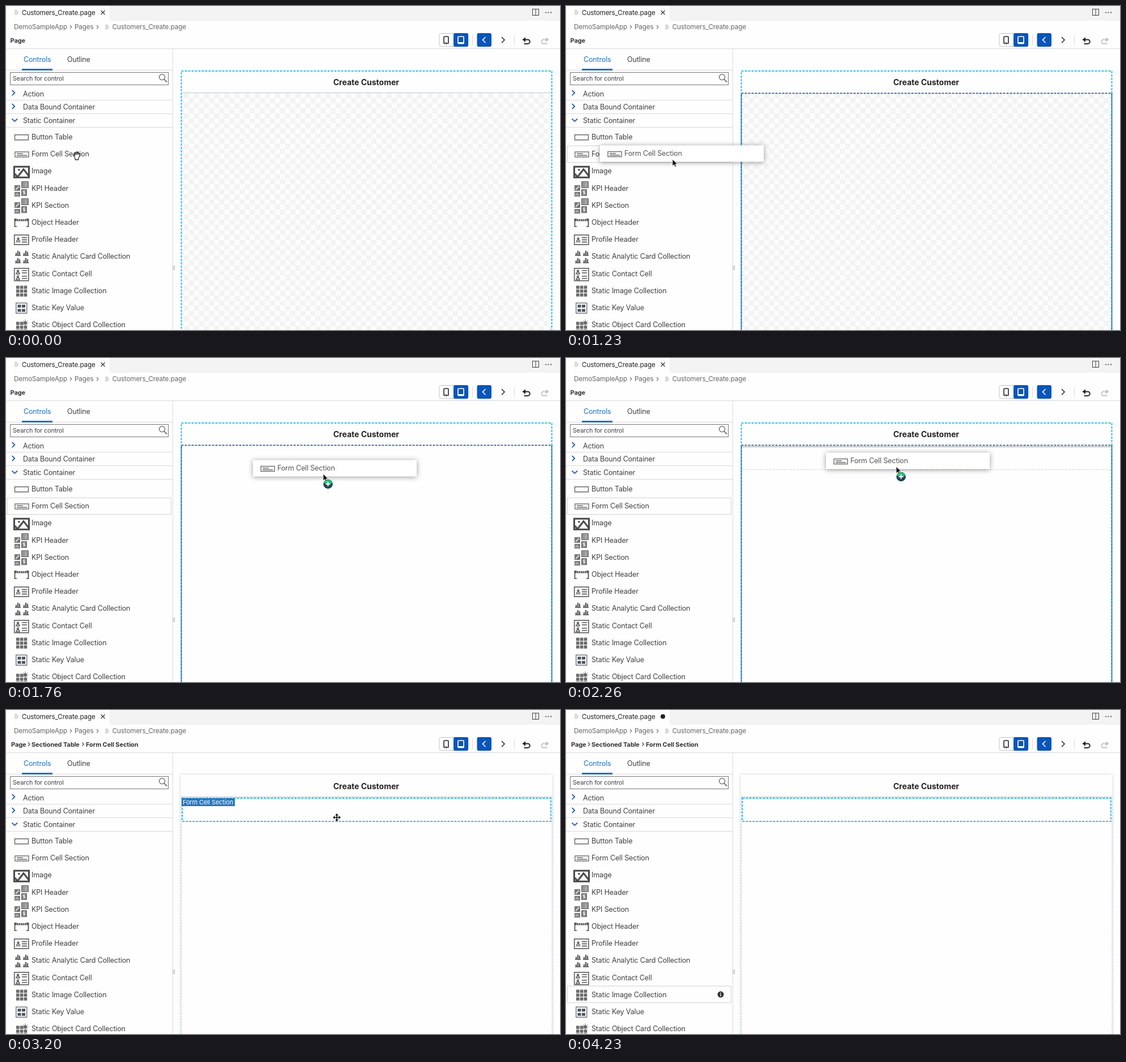
Recreate the animation shown at these times as an HTML page. Size 978 by 573 pixels, loop 4.63 s.

```html
<!DOCTYPE html>
<html lang="en">
<head>
<meta charset="utf-8">
<title>Page editor</title>
<style>
html, body { margin: 0; width: 100%; height: 100%; overflow: hidden; background: #fefefe; }
svg { display: block; }
text { font: 12.5px Inter, "Open Sans", sans-serif; letter-spacing: -.15px; fill: #404040; white-space: pre; }
.tab { font-size: 11.7px; fill: #222; }
.crumb { font-size: 11.7px; letter-spacing: -.11px; fill: #666; }
.path { font-size: 11px; font-weight: 700; letter-spacing: -.1px; fill: #333; }
.small { font-size: 10.9px; }
.label { font-size: 11px; fill: #fff; }
.title { font-size: 14px; font-weight: 700; letter-spacing: 0; fill: #222; }
.blue { fill: #1a6fc9; }
.card { fill: #555; }
</style>
</head>
<body>
<svg id="stage" width="978" height="573" viewBox="0 0 978 573"></svg>
<script>
const LOOP = 4630;
const CYAN = '#35bce6', NAVY = '#235f9b', BLUE = '#0a55b7', GRAY = '#6b6b6b';

const rect = (x, y, w, h, fill, more = '') =>
  `<rect x="${x}" y="${y}" width="${w}" height="${h}" fill="${fill}" ${more}/>`;
const line = (d, color, w = 1, more = '') =>
  `<path d="${d}" fill="none" stroke="${color}" stroke-width="${w}" ${more}/>`;
const box = (x, y, w, h, color, sw = 1, more = '') =>
  rect(x, y, w, h, 'none', `stroke="${color}" stroke-width="${sw}" ${more}`);
const dot = (x, y, r, fill) => `<circle cx="${x}" cy="${y}" r="${r}" fill="${fill}"/>`;
const text = (x, y, s, cls = '') => `<text x="${x}" y="${y}" class="${cls}">${s}</text>`;
const at = (x, y, s) => `<g transform="translate(${x} ${y})">${s}</g>`;
const show = (from, to, s) => `<g data-span="${from},${to}">${s}</g>`;
const dash = (a, b) => `stroke-dasharray="${a} ${b}"`;
const grid = (cols, rows, f) =>
  Array.from({ length: cols * rows }, (_, i) => f(i % cols, Math.floor(i / cols))).join('');

// Icons of the control list, drawn around the row centre
const person = (x, y) => dot(x, y - 2, 2.2, GRAY) + line(`M${x - 3} ${y + 3.5}q0 -3 3 -3t3 3z`, GRAY, 1.6);
const formIcon = box(16, -3.5, 24, 9, GRAY, 1.4) + line('M19 -.3h11M19 2.8h18', GRAY, 1.4);
const kpiIcon =
  rect(15, -5, 10, 10, '#777') + line('M17 3l6 -6', '#fff', 1.4) +
  rect(27, -12, 13, 12, '#777') + line('M29 -9h2m1 0h6M29 -6h2m1 0h6M29 -3h2m1 0h6', '#fff') +
  rect(15, 7, 10, 8, '#777') + line('M17.5 13v-3m2.5 3v-4m2.5 4v-2', '#fff') +
  rect(27, 2, 10, 12, '#777') + line('M34 5.5q-4 -1.5 -4 .8t4 2q0 3 -4 1.7M32 4v8', '#fff');
const icons = {
  'Button Table': box(15.5, -3.5, 24, 9, GRAY, 1.5),
  'Form Cell Section': formIcon,
  'Image': box(14.5, -7.5, 26, 19, '#484848', 3) +
    line('M20 11l11 -14 10 13M20 11l-4 -6', '#484848', 3) + dot(23, -2, 1.8, '#484848'),
  'KPI Header': kpiIcon,
  'KPI Section': kpiIcon,
  'Object Header': line('M19 -5.5h-3.5v13h3.5M36 -5.5h3.5v13h-3.5', '#555', 1.8) +
    line('M16 -3.5h23', '#555', 3.6, dash(2.6, .8)),
  'Profile Header': box(14.8, -7.5, 25, 17, GRAY, 1.8) + person(21.5, 1) + line('M28 -3h9M28 1h9M28 5h9', GRAY, 1.8),
  'Static Analytic Card Collection': grid(2, 2, (i, j) =>
    at(16 + i * 14, j * 13, line('M0 -1.5h10', '#555', 1.5) + line('M2 -2v-4m3 4v-8m3 8v-6', '#555', 2.2))),
  'Static Contact Cell': box(14.8, -9, 25, 22, GRAY, 1.8) + person(21, -2.5) + person(21, 7.5) +
    line('M28 -5h9M28 -1h9M28 5h9M28 9h9', GRAY, 1.6),
  'Static Image Collection': grid(3, 3, (i, j) => rect(18 + i * 6.8, -8.5 + j * 6.8, 5.6, 5.6, GRAY)),
  'Static Key Value': box(17.8, -8, 19, 18, '#667', 1.3) +
    grid(2, 2, (i, j) => rect(20.5 + i * 7.5, -5 + j * 7.5, 6, 5, '#4a5560')),
  'Static Object Card Collection':
    grid(3, 3, (i, j) => i == 2 && !j ? '' : rect(18 + i * 6.8, -5 + j * 6.8, 5.6, 5.6, GRAY)) +
    dot(34, -3, 3, GRAY) + line('M34 -9v12M28 -3h11M30 -7l8 8M38 -7l-8 8', GRAY)
};
const rowY = i => 231.3 + i * 30.2;
const rows = Object.keys(icons).map((name, i) =>
  at(0, rowY(i), icons[name] + text(45, 4.6, name))).join('');

const listMark = (x, y) => line(`M${x} ${y - 3}h5M${x} ${y}h7M${x} ${y + 3}h6`, '#999');
const chevron = (x, y, color, w = 1.2, s = 3) => line(`M${x - s / 2} ${y - s}l${s} ${s}l${-s} ${s}`, color, w);
const info = y => dot(273, y, 5.5, '#333') + line(`M273 ${y - 3.3}v1.6m0 1v3.8`, '#fff', 1.5);
const hover = y => box(2.5, y - 14.7, 289, 29.5, '#d2d2d2');

const tabs = rect(183, 0, 795, 26, '#f3f3f3') + listMark(15, 11) +
  text(28, 15.7, 'Customers_Create.page', 'tab') +
  show(0, 3630, line('M167.5 8l7 7m0 -7l-7 7', '#333', 1.2)) +
  show(3630, LOOP, dot(171, 11.5, 4, '#222')) +
  box(929.5, 5.5, 11, 11, '#444') + line('M935 6v10', '#444') +
  [953, 957.5, 962].map(x => dot(x, 11.5, 1.1, '#444')).join('');

const crumbs = text(14, 41, 'DemoSampleApp', 'crumb') + chevron(114.5, 37, '#777') +
  text(121, 41, 'Pages', 'crumb') + chevron(161.5, 37, '#777') + listMark(175, 37) +
  text(187.5, 41, 'Customers_Create.page', 'crumb') +
  show(0, 2760, text(7.5, 64.5, 'Page', 'path')) +
  show(2760, LOOP, text(9, 64.5, 'Page', 'path') + chevron(40.5, 60.5, '#444') +
    text(45, 64.5, 'Sectioned Table', 'path') + chevron(136, 60.5, '#444') +
    text(141, 64.5, 'Form Cell Section', 'path'));

const undo = color => line('M1 4h8.2a3.6 3.6 0 0 1 0 7.2h-6.7', color, 1.9) +
  `<path d="M-.5 4l5.5 -4.3v8.6z" fill="${color}"/>`;
const toolbar = box(765, 48.5, 51, 23, '#c4c4c4', 1, 'rx="3"') +
  box(773, 54, 8, 12.5, '#222', 1.6, 'rx="1.5"') + line('M775.5 64.5h3', '#222') +
  rect(790, 48, 26, 24, BLUE, 'rx="3"') + box(798, 54, 10, 12.5, '#fff', 1.7, 'rx="1"') + line('M798 65h10', '#fff', 2) +
  rect(831.5, 48, 25.5, 24, BLUE, 'rx="3"') + line('M846.5 55l-5 5 5 5', '#fff', 1.6) +
  chevron(877.5, 60, '#333', 1.6, 5) + line('M823.5 50v20M897.5 50v20', '#ddd') +
  at(912, 55.5, undo('#222')) + `<g transform="translate(958 55.5) scale(-1 1)">${undo('#c4c4c4')}</g>` +
  line('M0 75.5h978', '#dadada');

const panel = line('M294.5 76v497', '#dcdcdc') + line('M.5 0v573', '#fdeeea') +
  text(31, 99.2, 'Controls', 'blue') + text(108, 99.2, 'Outline') +
  line('M0 113.5h294', '#d9d9d9') + rect(28, 111, 54, 3, '#1a6fc9') +
  box(7.5, 117.5, 279, 22, '#777') + text(12, 132.3, 'Search for control', 'small') +
  `<circle cx="275.5" cy="125.7" r="5" fill="none" stroke="#777" stroke-width="1.5"/>` + line('M279 129.5l5 5', '#777', 2) +
  line('M0 166.5h294M0 190.5h294M0 214.5h294', '#dadada') +
  chevron(13, 153.5, NAVY, 1.8, 4.6) + chevron(13, 177.5, NAVY, 1.8, 4.6) + line('M10.5 199.5l4.8 4.6 4.8 -4.6', NAVY, 1.8) +
  text(30, 159.5, 'Action') + text(30, 183.4, 'Data Bound Container') + text(30, 207.4, 'Static Container') +
  line('M295 459v8M297.5 459v8', '#aaa') +
  show(130, 2600, hover(rowY(1) + .5)) + show(130, 1160, info(rowY(1) + .3)) +
  show(4230, LOOP, hover(rowY(9) - .2) + info(rowY(9))) + rows;

const page =
  show(0, 1760, rect(310, 154, 653, 419, 'url(#checker)')) +
  show(0, 2600, box(309.5, 115, 654, 480, CYAN, 2, dash(4, 2))) +
  show(0, 1160, line('M311 153.5h651', '#b9cfd3')) +
  show(1160, 2600, box(309.5, 154.3, 654, 450, NAVY, 1.8, dash(4, 2))) +
  show(1960, 2600, line('M311 157h651', '#b5b5ba', 1.6) + line('M311 197.5h651', '#b4dff0', 1, dash(4, 2))) +
  show(2600, LOOP,
    rect(308.5, 114.5, 656, 500, '#fefefe', 'style="filter:drop-shadow(0 0 2px #0003)"') +
    line('M309 153.5h655', '#c9d3d8') + box(309.5, 154.5, 654.5, 450, '#a9cfe2', 1, dash(3, 2))) +
  show(2760, LOOP, box(311.3, 156, 650.5, 41, CYAN, 2, dash(4, 2))) +
  show(3130, 3430, rect(310, 156, 94, 14, '#2a76bb') + text(312, 167, 'Form Cell Section', 'label')) +
  text(577.7, 139.5, 'Create Customer', 'title');

const dragCard = rect(0, 0, 289, 29, '#fff', 'style="filter:drop-shadow(0 1px 5px #0006)"') +
  at(-2, 14.5, formIcon) + text(43, 18.8, 'Form Cell Section', 'card');

const solid = (d, fill, stroke, w) =>
  `<path d="${d}" fill="${fill}" stroke="${stroke}" stroke-width="${w}" stroke-linejoin="round"/>`;
const arrow = solid('M0 0v12l2.7 -2.5 1.8 4 2.1 -.9 -1.8 -3.9h3.8z', '#111', '#fff', .7);
const openHand = solid('M-5.5 1q-2 -2 0 -2.5l2 1.5 -1 -4q0 -1.5 1.5 -1l1.3 3v-4q1 -1.3 2 0v4l1 -3.5q1.2 -1 1.8 .3l-.6 3.7 1.2 -1.5q1.5 -.6 1.7 .6l-1.7 5 -1.5 3v1.8h-5.5v-1.8z', '#fff', '#111', 1.1);
const closedHand = solid('M-5 1q-2 -3 0 -3.5l1 1v-2q1 -1.5 2 -.3 1 -1.2 2.2 0 1.2 -1 2.2 .2 1.5 -.8 2 .6v4l-1.5 3v2.5h-5.5v-2.5z', '#fff', '#111', 1.1) +
  line('M-1.9 -3v2.5M.4 -3.5v3M2.6 -3v2.5', '#111', .9);
const plusBadge = dot(8.5, 18, 8.3, '#1d4653') +
  '<path d="M.8 16a8 8 0 0 1 15.4 0q-7.7 3 -15.4 0z" fill="#1fc36f"/>' + line('M8.5 14v8M4.5 18h8', '#fff', 1.8);
const fourWay = line('M-5 0h10M0 -5v10', '#111', 1.6) +
  '<path d="M0 -7l3 3.5h-6zM0 7l3 -3.5h-6zM-7 0l3.5 -3v6zM7 0l-3.5 -3v6z" fill="#111"/>';
const cursors = show(0, 830, openHand) + show(830, 1160, closedHand) + show(1430, 2600, plusBadge) +
  show(1160, 2860, arrow) + show(2860, 3530, fourWay) + show(3530, 3730, arrow);

const TILE = 17.9, CELL = TILE / 2;
const checker = `<defs><pattern id="checker" x="304.9" y="145.2" width="${TILE}" height="${TILE}" patternUnits="userSpaceOnUse">` +
  rect(0, 0, TILE, TILE, '#fcfcfc') + rect(0, 0, CELL, CELL, '#f3f3f4') + rect(CELL, CELL, CELL, CELL, '#f3f3f4') +
  '</pattern></defs>';

const stage = document.getElementById('stage');
stage.innerHTML = checker + tabs + crumbs + toolbar + panel + page +
  show(1160, 2600, `<g id="card">${dragCard}</g>`) + `<g id="cursor">${cursors}</g>`;

// Pointer: time, x, y; each place holds until the next
const pointer = [
  [0, 125.5, 264.5], [30, 126, 266], [130, 128, 269], [230, 129, 271], [330, 130, 272],
  [1160, 152, 272], [1230, 188, 271], [1330, 226, 268], [1360, 243, 266], [1430, 268, 262],
  [1460, 290, 258], [1560, 331, 253], [1660, 450, 225], [1760, 560, 205], [1960, 590, 198],
  [2130, 588, 196], [2160, 586, 194], [2260, 583, 192], [2360, 583, 191], [2600, 584, 190],
  [3430, 565, 222], [3530, 468, 340], [3630, 365, 455], [3660, 320, 508], [3730, 250, 600]
];
const spans = [...stage.querySelectorAll('[data-span]')].map(el => [el, ...el.dataset.span.split(',').map(Number)]);
const card = document.getElementById('card'), cursor = document.getElementById('cursor');
const move = (el, x, y) => el.setAttribute('transform', `translate(${x} ${y})`);

function frame() {
  const t = performance.now() % LOOP;
  for (const [el, from, to] of spans) el.style.display = t >= from && t < to ? '' : 'none';
  const [, x, y] = pointer.findLast(p => p[0] <= t);
  move(cursor, x, y);
  move(card, x - (t < 1330 ? 128 : 124), y - 24.5);
  requestAnimationFrame(frame);
}
frame();
</script>
</body>
</html>
```
